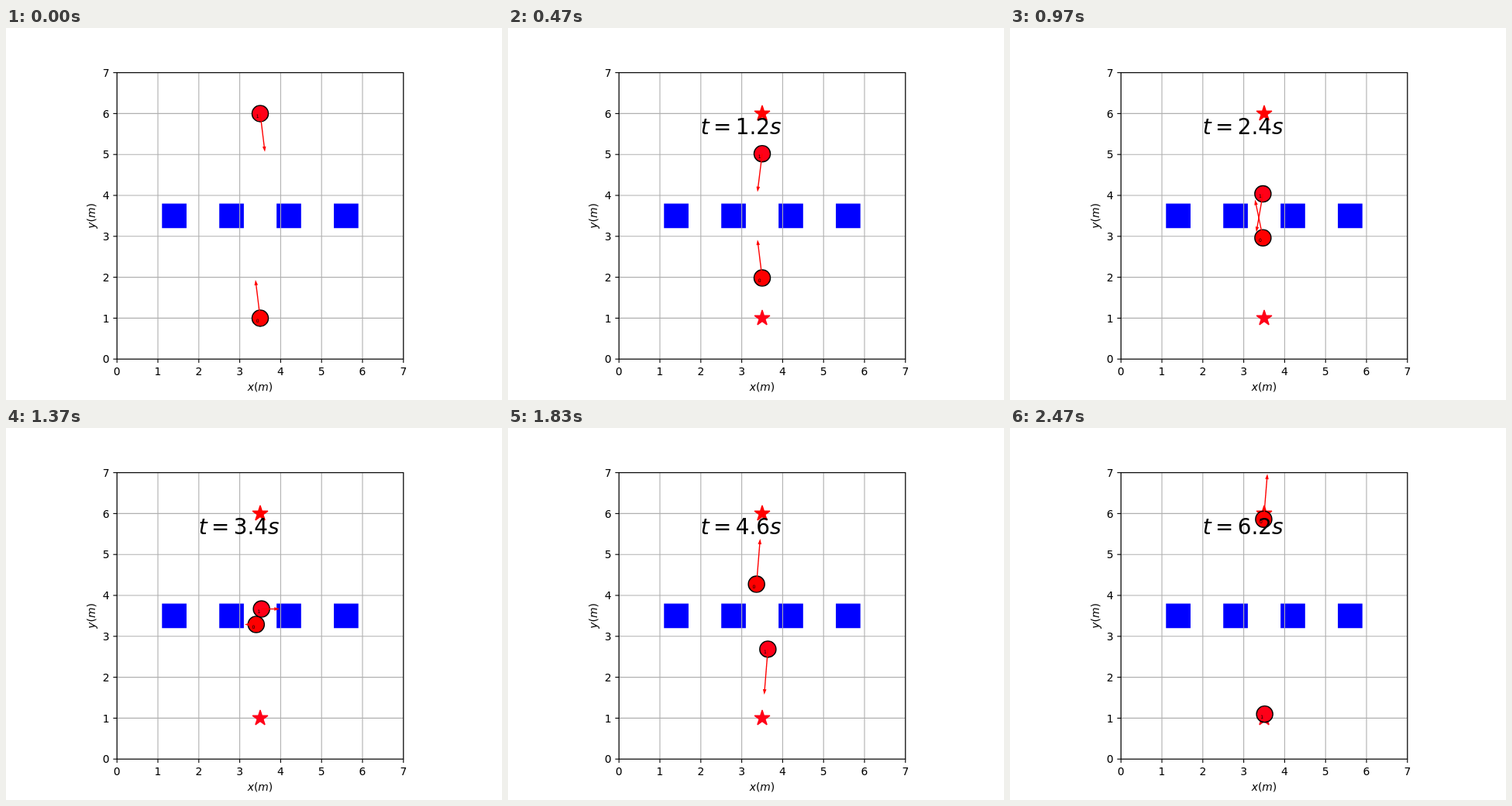
Animation, 640 px wide and 480 px high, one loop 2530 ms. Source, as an HTML page with a canvas:

```html
<!DOCTYPE html>
<html>
<head>
<meta charset="utf-8">
<style>
html, body { margin: 0; width: 100%; height: 100%; overflow: hidden; background: #fff; }
canvas { display: block; }
</style>
</head>
<body>
<canvas id="stage" width="640" height="480"></canvas>
<script>
const ctx = document.getElementById('stage').getContext('2d');
const LOOP = 2530, UNIT = 52.8, PT = 100 / 72;
const px = x => 143.2 + UNIT * x;
const py = y => 427.2 - UNIT * y;

const robots = [
  { start: 1, goal: 6, side: -1, brake: 28, beat: Math.PI, phase: Math.PI, color: '#f00' },
  { start: 6, goal: 1, side: 1, brake: 28.5, beat: Math.PI * 8 / 9, phase: 0, color: '#ff0018' }
];

function smooth(from, to, n) {
  const u = Math.min(1, Math.max(0, (n - from) / (to - from)));
  return u * u * (3 - 2 * u);
}

// Distance covered when speed rises evenly from 0 to 1 over the given time
function speedUp(t, time) {
  if (t <= 0) return 0;
  return t < time ? t * t / (2 * time) : t - time / 2;
}

// Approach, stop face to face, slide past each other, then run straight to the goal
function position({ start, side, brake }, n) {
  const travel = 4.32 * Math.min(n, brake) + 5.24 * speedUp(n - 35, 2.2);
  const drift = -2.2 * (smooth(18, 27, n) - smooth(32, 39, n));
  const dodge = 3.7 * smooth(24, 36, n) + 7 * smooth(34, 38, n) - 0.42 * Math.max(0, n - 38);
  return { x: px(3.5) + drift + side * dodge, y: py(start) + side * travel };
}

function pose(robot, n) {
  const now = position(robot, n), next = position(robot, n + 1);
  const arrived = Math.abs(now.y - py(robot.goal)) < 0.1 * UNIT;
  // heading flips from side to side during the approach
  const sway = n < 26 ? 5.3 * Math.sign(Math.cos(robot.beat * n + robot.phase)) : 0;
  return {
    ...now, arrived, color: robot.color,
    vx: (next.x - now.x) * 10 + sway,
    vy: (next.y - now.y) * 10
  };
}

function line(x0, y0, x1, y1, color) {
  ctx.strokeStyle = color;
  ctx.lineWidth = 0.8 * PT;
  ctx.beginPath();
  ctx.moveTo(x0, y0);
  ctx.lineTo(x1, y1);
  ctx.stroke();
}

function text(str, x, y, size, style = '', align = 'left') {
  ctx.font = `${style} ${size}px "DejaVu Sans", sans-serif`;
  ctx.textAlign = align;
  ctx.fillStyle = '#000';
  ctx.fillText(str, x, y);
}

function axisLabel(name, x, y, angle) {
  const size = 10 * PT;
  ctx.save();
  ctx.translate(x, y);
  ctx.rotate(angle);
  text(name, -16.3, 0, size, 'italic');
  text('(', -8.1, 0, size);
  text('m', -2.7, 0, size, 'italic');
  text(')', 10.8, 0, size);
  ctx.restore();
}

function drawAxes() {
  ctx.fillStyle = '#fff';
  ctx.fillRect(0, 0, 640, 480);
  ctx.fillStyle = '#00f';
  for (let i = 0; i < 4; i++) ctx.fillRect(px(1.1 + 1.4 * i), py(3.8), 0.6 * UNIT, 0.6 * UNIT);

  const left = px(0), right = px(7), top = py(7), bottom = py(0);
  for (let i = 0; i <= 7; i++) {
    const x = px(i), y = py(i);
    line(x, top, x, bottom, '#b0b0b0');
    line(left, y, right, y, '#b0b0b0');
    line(x, bottom, x, bottom + 4.86, '#000');
    line(left, y, left - 4.86, y, '#000');
    text(i, x, 448, 10 * PT, '', 'center');
    text(i, 133.5, y + 5.2, 10 * PT, '', 'right');
  }
  ctx.strokeStyle = '#000';
  ctx.strokeRect(left, top, right - left, bottom - top);
  axisLabel('x', 328, 468, 0);
  axisLabel('y', 115.3, 242.4, -Math.PI / 2);
}

function drawStar({ goal, color }) {
  ctx.beginPath();
  for (let i = 0; i < 10; i++) {
    const r = 7.5 * PT * (i % 2 ? 0.382 : 1), a = i * Math.PI / 5;
    ctx.lineTo(px(3.5) + r * Math.sin(a), py(goal) - r * Math.cos(a));
  }
  ctx.closePath();
  ctx.fillStyle = ctx.strokeStyle = color;
  ctx.lineWidth = PT;
  ctx.lineJoin = 'bevel';
  ctx.fill();
  ctx.stroke();
  ctx.lineJoin = 'miter';
}

function drawBody({ x, y, color }) {
  ctx.beginPath();
  ctx.arc(x, y, 0.2 * UNIT, 0, 2 * Math.PI);
  ctx.fillStyle = color;
  ctx.strokeStyle = '#000';
  ctx.lineWidth = PT;
  ctx.fill();
  ctx.stroke();
}

function drawArrow({ x, y, vx, vy, arrived }) {
  const len = Math.hypot(vx, vy);
  if (arrived || len < 0.1) return;
  ctx.save();
  ctx.translate(x, y);
  ctx.rotate(Math.atan2(vy, vx));
  ctx.fillStyle = ctx.strokeStyle = '#f00';
  ctx.lineWidth = PT;
  ctx.beginPath();
  ctx.moveTo(0, 0);
  ctx.lineTo(len, 0);
  ctx.stroke();
  ctx.beginPath();
  ctx.moveTo(len, -0.025 * UNIT);
  ctx.lineTo(len + 0.075 * UNIT, 0);
  ctx.lineTo(len, 0.025 * UNIT);
  ctx.closePath();
  ctx.fill();
  ctx.stroke();
  ctx.restore();
}

function drawClock(n) {
  const size = 20 * PT, y = 137.3;
  text('t', 248.8, y, size, 'italic');
  text('=', 265.1, y, size);
  text((n / 10).toFixed(1), 293.8, y, size);
  text('s', 338, y, size, 'italic');
}

// 25 steps per second shown on a 30 Hz clock with 10 ms ticks
function stepAt(ms) {
  const tick = Math.floor((Math.floor(ms / 10) * 10 + 3.4) * 0.03);
  return Math.max(0, Math.ceil((tick * 5 - 3) / 6));
}

function frame() {
  const n = stepAt(performance.now() % LOOP);
  const poses = robots.map(r => pose(r, n));
  drawAxes();
  if (n > 0) robots.forEach(drawStar);
  poses.forEach(drawBody);
  poses.forEach(drawArrow);
  poses.forEach((p, i) => text(i, p.x - 0.1 * UNIT, p.y + 0.1 * UNIT, 6));
  if (n > 0) drawClock(n);
  requestAnimationFrame(frame);
}
frame();
</script>
</body>
</html>
```
